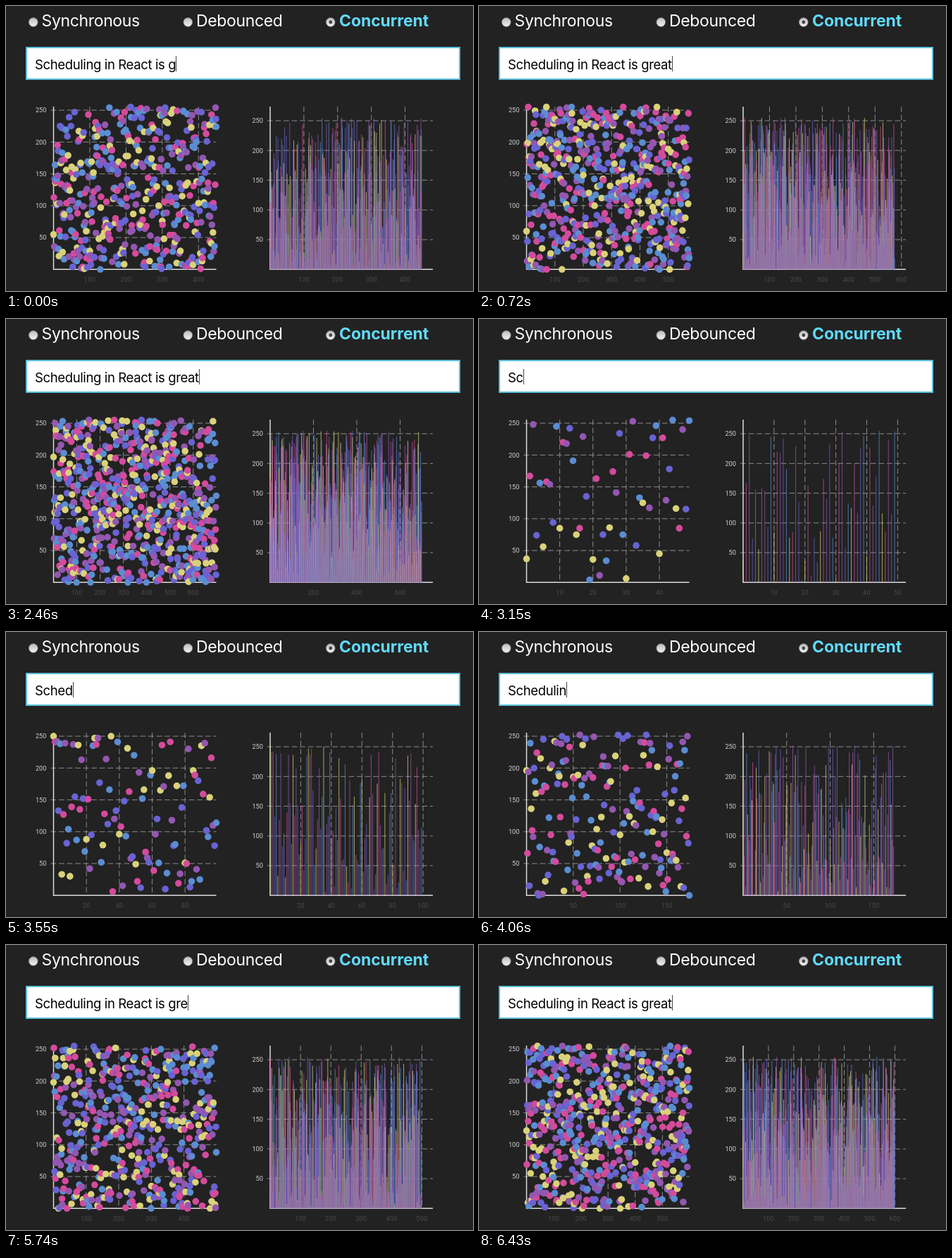
An HTML page for the animation above (6.53 s loop, 663 by 405 pixels).

```html
<!DOCTYPE html>
<html lang="en">
<head>
<meta charset="utf-8">
<title>Scheduling demo</title>
<style>
  html, body { margin: 0; width: 100%; height: 100%; overflow: hidden; background: #222; }
  svg { position: absolute; left: 0; top: 0; }
  .mode { font: 23px Inter, "Open Sans", sans-serif; letter-spacing: -.35px; fill: #fff; }
  .active { font-weight: 700; letter-spacing: -.1px; fill: #61dafb; }
  .ticks { font: 9.24px Roboto, Arial, sans-serif; }
  .ytick { fill: #cfcfcf; text-anchor: end; }
  .xtick { fill: #4a4a4a; text-anchor: middle; letter-spacing: .2px; }
  .grid { stroke: #989898; stroke-width: .9; stroke-dasharray: 7.7 3.85; }
  .axis { stroke: #dcdcdc; stroke-width: 1.5; fill: none; }
  .bars { stroke-width: .8; stroke-opacity: .92; }
  #field {
    position: absolute; left: 28px; top: 58px; width: 617px; height: 47px;
    box-sizing: border-box; background: #fff; border: 2px solid #5cc0da;
  }
  #line {
    position: absolute; left: 41px; top: 71px; height: 24px; white-space: pre;
    font: 18.5px/24px Inter, "Open Sans", sans-serif; letter-spacing: -.37px; color: #000;
  }
  #caret {
    position: absolute; left: 100%; top: 0; width: 1px; height: 22px; background: #444;
  }
</style>
</head>
<body>
<svg width="663" height="405" viewBox="0 0 663 405">
  <defs>
    <linearGradient id="knob" x1="0" y1="0" x2="0" y2="1">
      <stop offset="0" stop-color="#bcbcbc"/>
      <stop offset="1" stop-color="#f2f2f2"/>
    </linearGradient>
  </defs>
  <g fill="url(#knob)" stroke="#8c8c8c" stroke-width=".8">
    <circle cx="38.8" cy="23" r="6.3"/>
    <circle cx="258.3" cy="23" r="6.3"/>
    <circle cx="460.8" cy="23" r="6.3"/>
  </g>
  <circle cx="460.8" cy="23" r="2.4" fill="#444"/>
  <text class="mode" x="50.5" y="29">Synchronous</text>
  <text class="mode" x="270" y="29">Debounced</text>
  <text class="mode active" x="473" y="29">Concurrent</text>
  <g id="charts"></g>
</svg>
<div id="field"></div>
<div id="line"><span id="typed"></span><span id="caret"></span></div>
<script>
const LOOP = 6530;
const CLEARED = 2750;     // the field is emptied and typing starts over
const HEAD_START = 2720;  // how far into the typing the loop opens
const IDLE = 3220, BLINK = 490;
const PHRASE = 'Scheduling in React is great';
const COLORS = ['#dad27a', '#d44b9c', '#9457b1', '#6963d3', '#5b8dd2'];
const TOP = 143, BASE = 374.3, WIDTH = 231;

// [ms since the field was cleared, letters]; the charts lag behind the typing.
const typing = [[44, 0], [170, 1], [790, 5], [2000, 16], [2700, 24], [3260, 28]];
const drawing = [[0, 1], [790, 4], [2000, 12], [2700, 18], [2980, 20], [3430, 23], [4650, 28]];

function count(keys, t) {
  const next = keys.findIndex(([time]) => time > t);
  if (next < 0) return keys[keys.length - 1][1];
  if (next === 0) return keys[0][1];
  const [t0, n0] = keys[next - 1], [t1, n1] = keys[next];
  return Math.floor(n0 + (n1 - n0) * (t - t0) / (t1 - t0));
}

function random(seed) {
  let s = seed * 7919 + 17;
  return () => {
    s = (s + 0x6d2b79f5) | 0;
    let z = Math.imul(s ^ (s >>> 15), 1 | s);
    z = (z + Math.imul(z ^ (z >>> 7), 61 | z)) ^ z;
    return ((z ^ (z >>> 14)) >>> 0) / 4294967296;
  };
}

function tickStep(span) {
  const raw = span / 5, power = 10 ** Math.floor(Math.log10(raw)), e = raw / power;
  return power * (e >= Math.sqrt(50) ? 10 : e >= Math.sqrt(10) ? 5 : e >= Math.SQRT2 ? 2 : 1);
}

const line = (x1, y1, x2, y2) =>
  `<line x1="${x1.toFixed(2)}" y1="${y1.toFixed(2)}" x2="${x2.toFixed(2)}" y2="${y2.toFixed(2)}"/>`;

function frame(left, span, xAt, yAt) {
  const right = left + WIDTH, step = tickStep(span);
  let grid = '', labels = '';
  for (let v = 50; v <= 250; v += 50) {
    const y = yAt(v);
    grid += line(left - 4, y, right, y);
    labels += `<text class="ytick" x="${left - 10}" y="${y + 3.3}">${v}</text>`;
  }
  for (let v = step; v <= span; v += step) {
    const x = xAt(v);
    grid += line(x, TOP, x, BASE);
    labels += `<text class="xtick" x="${x}" y="392">${v}</text>`;
  }
  return `<g class="grid">${grid}</g><g class="ticks">${labels}</g>` +
    `<path class="axis" d="M${left} ${TOP}V${BASE}H${right}"/>`;
}

// Each letter adds 25 points, coloured in turn.
function charts(letters) {
  const next = random(letters);
  const data = Array.from({ length: letters * 25 }, () => Math.floor(next() * 256));
  const last = data.length - 1;
  const color = i => COLORS[i % COLORS.length];

  const dotX = v => 67.5 + v / last * WIDTH, dotY = v => BASE - v * .905;
  const dots = data.map((v, i) =>
    `<circle cx="${dotX(i).toFixed(2)}" cy="${dotY(v).toFixed(2)}" r="4.8" fill="${color(i)}"/>`);

  const barX = v => 375 + v / last * 215, barY = v => BASE - v * .845;
  const bars = data.map((v, i) =>
    `<g stroke="${color(i)}">${line(barX(i), BASE, barX(i), barY(v))}</g>`);

  return frame(67.5, last, dotX, dotY) + dots.join('') +
    frame(375, last * WIDTH / 215, barX, barY) + `<g class="bars">${bars.join('')}</g>`;
}

const $ = id => document.getElementById(id);
const cache = {};
let shown = 0;

function draw(time) {
  const t = time < CLEARED ? time + HEAD_START : time - CLEARED;
  const letters = count(drawing, t);
  if (letters !== shown) {
    $('charts').innerHTML = cache[letters] ||= charts(letters);
    shown = letters;
  }
  $('typed').textContent = PHRASE.slice(0, count(typing, t));
  const hidden = t > IDLE && Math.floor((t - IDLE) / BLINK) % 2;
  $('caret').style.opacity = hidden ? 0 : 1;
}

const began = performance.now();
function tick() {
  draw((performance.now() - began) % LOOP);
  requestAnimationFrame(tick);
}
tick();
</script>
</body>
</html>
```
